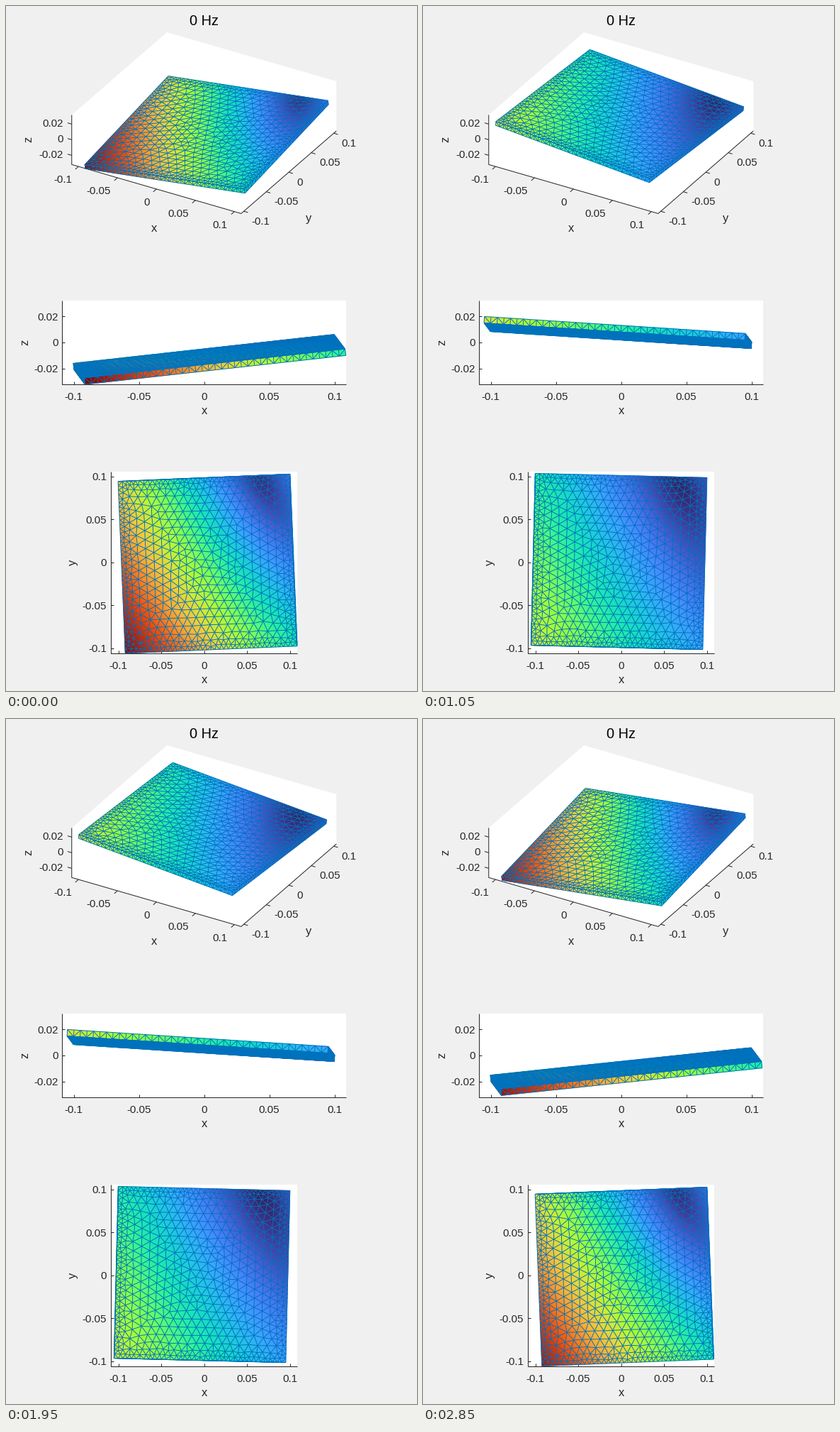
Recreate the animation shown at these times as a matplotlib script. Size 580 by 965 pixels, loop 3000 ms.

```python
import itertools

import matplotlib.pyplot as plt
import numpy as np
from matplotlib.animation import FuncAnimation
from matplotlib.collections import LineCollection
from matplotlib.patches import Polygon
from matplotlib.tri import Triangulation

WIDTH, HEIGHT, DPI = 580, 965, 100
FRAMES, INTERVAL = 20, 150
PT = 72 / DPI                       # points per pixel
INK, EDGE = "#262626", "#0072BD"

HALF, THICK = 0.1, 0.0025           # half side and half thickness of the plate
LIMITS = np.array([0.1087, 0.1058, 0.0318])

# Linearised rigid-body motion: shift + spin x position
SHIFT = np.array([0.0042, -0.0016, -0.01295])
WX, WY, WZ = 0.0555, -0.1105, 0.042
SPIN = np.array([[0, -WZ, WY], [WZ, 0, -WX], [-WY, WX, 0]])

plt.rcParams["font.family"] = "Liberation Sans"
fig = plt.figure(figsize=(WIDTH / DPI, HEIGHT / DPI), dpi=DPI, facecolor="#F0F0F0")
ax = fig.add_axes([0, 0, 1, 1])
ax.set_xlim(0, WIDTH)
ax.set_ylim(HEIGHT, 0)
ax.axis("off")


def displacement(points):
    return SHIFT + points @ SPIN.T


def ring(half, step, offset):
    """Evenly spaced points along the outline of a square."""
    n = max(round(2 * half / step), 1)
    t = -half + 2 * half * (np.arange(n) + offset) / n
    side = np.full(n, half)
    return np.concatenate([np.c_[t, -side], np.c_[side, t],
                           np.c_[-t, side], np.c_[-side, -t]])


def plate_mesh():
    """Triangle mesh on the unit square, finer towards the outline."""
    rings = [ring(HALF, 0.005, 0)]
    depth, step = 0.0045, 0.0058
    for i in itertools.count(1):
        if HALF - depth < 0.004:
            break
        rings.append(ring(HALF - depth, step, 0.5 * (i % 2)))
        step = min(step * 1.3, 0.0104)
        depth += 0.88 * step
    points = np.concatenate(rings)
    fixed = len(rings[0])
    rng = np.random.default_rng(4)
    points[fixed:] += rng.normal(0, 0.0005, points[fixed:].shape)
    for _ in range(5):
        a, b = Triangulation(*points.T).edges.T
        total, count = np.zeros_like(points), np.zeros(len(points))
        for i, j in ((a, b), (b, a)):
            np.add.at(total, i, points[j])
            np.add.at(count, i, 1)
        points[fixed:] = (total / count[:, None])[fixed:]
    tri = Triangulation(*points.T)
    return points / (2 * HALF) + 0.5, tri.triangles, tri.edges


def strip_mesh(n=40):
    """One row of cells with alternating diagonals."""
    u = np.linspace(0, 1, n + 1)
    points = np.concatenate([np.c_[u, 0 * u], np.c_[u, 0 * u + 1]])
    triangles = []
    for i in range(n):
        a, b, c, d = i, i + 1, i + n + 2, i + n + 1
        triangles += [(a, b, c), (a, c, d)] if i % 2 else [(a, b, d), (b, c, d)]
    tri = Triangulation(*points.T, triangles)
    return points, tri.triangles, tri.edges


class View:
    """Orthographic camera given by azimuth, elevation, scale and centre."""

    def __init__(self, azimuth, elevation, scale, centre):
        az, el = np.radians([azimuth, elevation])
        right = np.array([np.cos(az), np.sin(az), 0])
        up = np.array([-np.sin(el) * np.sin(az), np.sin(el) * np.cos(az), np.cos(el)])
        self.matrix = scale * np.array([right, -up])
        self.centre = np.array(centre)

    def __call__(self, points):
        return self.centre + np.asarray(points) @ self.matrix.T

    def faces_camera(self, a, b):
        (ax_, ay), (bx, by) = self.matrix @ a, self.matrix @ b
        return ay * bx - ax_ * by > 1e-6


class Face:
    """A rectangle of the plate; a x b points outwards."""

    def __init__(self, origin, a, b, mesh):
        uv, self.triangles, self.edges = mesh
        self.a, self.b = np.array(a, float), np.array(b, float)
        self.points = origin + uv[:, :1] * self.a + uv[:, 1:] * self.b
        self.move = displacement(self.points)
        self.size = np.linalg.norm(self.move, axis=1)


class Patch:
    """One face seen in one view."""

    def __init__(self, face, view):
        self.face, self.view = face, view
        x, y = view(face.points).T
        self.tri = Triangulation(x, y, face.triangles)
        self.fill = ax.tripcolor(self.tri, face.size, shading="gouraud",
                                 cmap="turbo", vmin=0, vmax=PEAK, zorder=2)
        self.lines = LineCollection([], colors=EDGE, linewidths=0.95 * PT, zorder=3)
        ax.add_collection(self.lines, autolim=False)

    def pose(self, swing):
        face = self.face
        bend = np.eye(3) + swing * SPIN
        shown = self.view.faces_camera(bend @ face.a, bend @ face.b)
        self.fill.set_visible(shown)
        self.lines.set_visible(shown)
        if shown:
            spots = self.view(face.points + swing * face.move)
            self.tri.x, self.tri.y = spots.T
            self.fill.set_array(abs(swing) * face.size)
            self.lines.set_segments(spots[face.edges])


def label(x, y, text, size=15, ha="center", color=INK, rotation=0):
    ax.text(x, y, text, fontsize=size * PT, ha=ha, va="baseline", color=color,
            rotation=rotation, rotation_mode="anchor")


def line(*points):
    ax.plot(*np.transpose(points), color=INK, lw=PT, zorder=1,
            solid_capstyle="butt", scalex=False, scaley=False)


def backdrop(corners):
    ax.add_patch(Polygon(corners, fc="white", ec="none", zorder=0))


WIDE, TALL = (-0.1, -0.05, 0, 0.05, 0.1), (-0.02, 0, 0.02)


def flat_axes(view, vertical, ticks):
    """Axes of a straight-on view: x across, the chosen axis upwards."""
    low, high = view(-LIMITS), view(LIMITS)
    x0, y0, x1, y1 = *low, *high
    backdrop([(x0, y0), (x1, y0), (x1, y1), (x0, y1)])
    line((x0, y1), (x0, y0), (x1, y0))
    for v in WIDE:
        x = view((v, 0, 0))[0]
        line((x, y0), (x, y0 - 4))
        label(x, y0 + 22, f"{v:g}")
    for v in ticks:
        y = view(v * np.eye(3)[vertical])[1]
        line((x0, y), (x0 + 4, y))
        label(x0 - 6, y + 5.4, f"{v:g}", ha="right")
    label(view.centre[0], y0 + 42.5, "x", 16.5)


def solid_axes(view):
    def at(*signs):
        return view(LIMITS * signs)

    left, front, right = at(-1, -1, -1), at(1, -1, -1), at(1, 1, -1)
    top = at(-1, -1, 1)
    backdrop([left, top, at(-1, 1, 1), at(1, 1, 1), right, front])
    line(top, left, front, right)
    lx, ly, lz = LIMITS
    for v in WIDE:
        p = view((v, -ly, -lz))
        line(p, p + (-4.5, 3.9))
        label(p[0] - 9.5, p[1] + 23.3, f"{v:g}", ha="right")
        p = view((lx, v, -lz))
        line(p, p + (5.8, 1.7))
        label(p[0] + 11.3, p[1] + 18.8, f"{v:g}", ha="left")
    for v in TALL:
        p = view((-lx, -ly, v))
        line(p, p + (-5.8, -1.7))
        label(p[0] - 12, p[1] + 3.2, f"{v:g}", ha="right")


solid = View(30, 30, 1270, (279.5, 164.7))
side = View(0, 0, 1840, (279.5, 474))
plan = View(0, 90, 1210, (279.5, 783.7))

label(279.5, 27, "0 Hz", 20, color="black")
solid_axes(solid)
flat_axes(side, 2, TALL)
flat_axes(plan, 1, WIDE)
label(209, 317.5, "x", 16.5)
label(427, 304, "y", 16.5)
label(36.5, 188, "z", 16.5, rotation=90)
label(31, 474, "z", 16.5, rotation=90)
label(99, 784, "y", 16.5, rotation=90)

PEAK = np.linalg.norm(displacement(np.array([-HALF, -HALF, -THICK])))
H, T, L = HALF, THICK, 2 * HALF
UP = (0, 0, 2 * T)
sheet, strip = plate_mesh(), strip_mesh()
faces = [
    Face((-H, -H, T), (L, 0, 0), (0, L, 0), sheet),
    Face((-H, H, -T), (L, 0, 0), (0, -L, 0), sheet),
    Face((-H, -H, -T), (L, 0, 0), UP, strip),
    Face((H, H, -T), (-L, 0, 0), UP, strip),
    Face((H, -H, -T), (0, L, 0), UP, strip),
    Face((-H, H, -T), (0, -L, 0), UP, strip),
]
patches = [Patch(f, v) for v in (solid, side, plan) for f in faces]


def update(frame):
    swing = np.cos(2 * np.pi * frame / FRAMES)
    for patch in patches:
        patch.pose(swing)
    return []


anim = FuncAnimation(fig, update, frames=FRAMES, interval=INTERVAL,
                     init_func=lambda: update(0), repeat=True)
plt.show()
```
